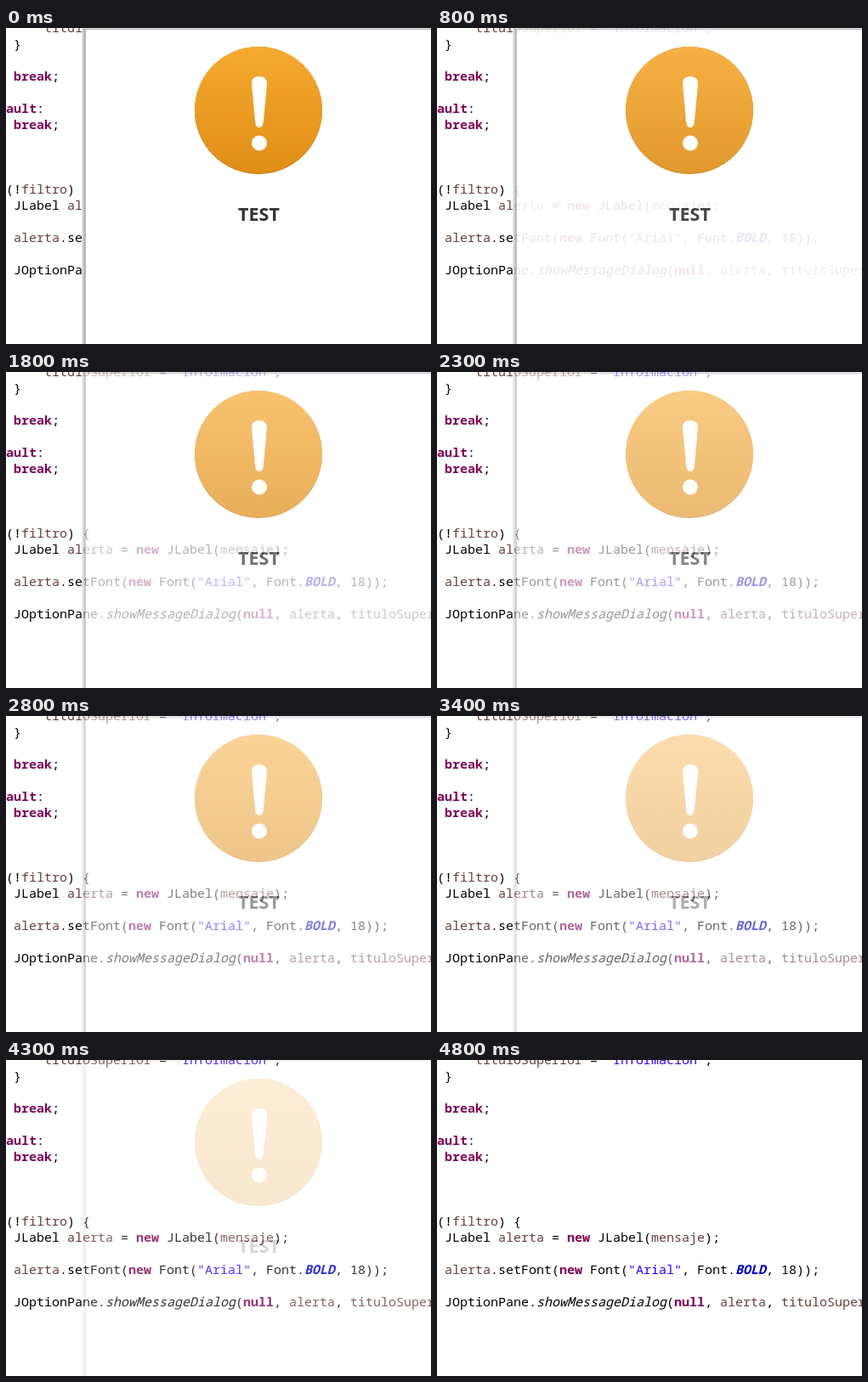
An HTML page for the animation above (5000 ms loop, 500 by 372 pixels).

```html
<!DOCTYPE html>
<html lang="es">
<head>
<meta charset="utf-8">
<style>
  html, body { margin: 0; width: 100%; height: 100%; overflow: hidden; background: #fff; }
  svg { display: block; }
  .code { font: 15px "Noto Sans Mono", "DejaVu Sans Mono", monospace; white-space: pre; }
  .key { fill: #7f0055; font-weight: 700; }
  .str { fill: #2a00ff; }
  .var { fill: #6a3e3e; }
  .call { font-style: italic; }
  .const { fill: #0000c0; font-weight: 700; font-style: italic; }
  .label { font: 700 21.5px "Noto Sans", "Open Sans", sans-serif; fill: #333; text-anchor: middle; }
</style>
</head>
<body>
<svg width="500" height="372" viewBox="0 0 500 372">
  <defs>
    <linearGradient id="orange" x2="0" y2="1">
      <stop stop-color="#f7a930"/>
      <stop offset="1" stop-color="#e08e16"/>
    </linearGradient>
    <linearGradient id="edge">
      <stop stop-color="#eee"/>
      <stop offset=".8" stop-color="#aaa"/>
      <stop offset="1" stop-color="#ccc"/>
    </linearGradient>
  </defs>

  <g class="code">
    <text x="45" y="5"><tspan class="var">tituloSuperior</tspan> = <tspan class="str">"Información"</tspan>;</text>
    <text x="9" y="24">}</text>
    <text x="9" y="62"><tspan class="key">break</tspan>;</text>
    <text x="0" y="100"><tspan class="key">ault</tspan>:</text>
    <text x="9" y="119"><tspan class="key">break</tspan>;</text>
    <text x="0" y="195">(!<tspan class="var">filtro</tspan>) {</text>
    <text x="9" y="214">JLabel <tspan class="var">alerta</tspan> = <tspan class="key">new</tspan> JLabel(<tspan class="var">mensaje</tspan>);</text>
    <text x="9" y="252"><tspan class="var">alerta</tspan>.setFont(<tspan class="key">new</tspan> Font(<tspan class="str">"Arial"</tspan>, Font.<tspan class="const">BOLD</tspan>, 18));</text>
    <text x="9" y="290">JOptionPane.<tspan class="call">showMessageDialog</tspan>(<tspan class="key">null</tspan>, <tspan class="var">alerta</tspan>, <tspan class="var">tituloSuperior</tspan></text>
  </g>

  <g id="dialog">
    <path fill="#fff" d="M89 0H500V372H89Z"/>
    <path fill="url(#edge)" d="M89 0H94V372H89Z"/>
    <path fill="#e2e2e2" d="M92 0H500V2H92Z"/>
    <path fill="#b4b4b4" d="M92 1H500V2H92Z"/>
    <circle cx="297" cy="97" r="75" fill="#c57b14"/>
    <ellipse cx="297" cy="96.4" rx="75" ry="74.4" fill="url(#orange)"/>
    <path fill="#fff" d="M289 66C289 60 292 57 298 57S307 60 307 66L303 109C302.500 115 301 117 298 117S293.500 115 293 109Z"/>
    <circle cx="298" cy="135.500" r="9" fill="#fff"/>
    <text class="label" x="297.5" y="227">TEST</text>
  </g>
</svg>
<script>
  const LOOP = 5000, FIRST = 800, STEP = 500;
  const dialog = document.getElementById("dialog");
  const start = performance.now();

  // One tenth fainter every half second; gone once it would reach 0.1.
  function opacityAt(t) {
    const steps = Math.max(0, Math.floor((t - FIRST) / STEP) + 1);
    return steps < 9 ? 1 - steps / 10 : 0;
  }

  function draw() {
    dialog.setAttribute("opacity", opacityAt((performance.now() - start) % LOOP));
    requestAnimationFrame(draw);
  }
  draw();
</script>
</body>
</html>
```
